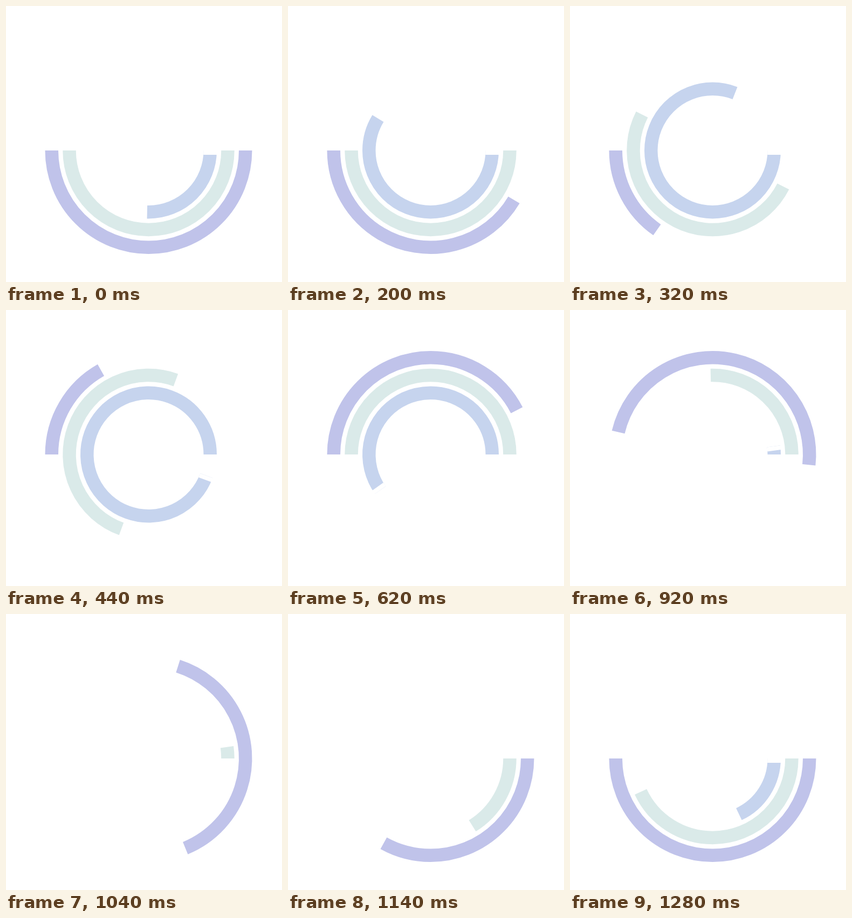
Write an HTML page with a canvas that moves like this. It is 512 px wide and 512 px high and loops after 1.3 s.

```html
<!DOCTYPE html>
<html lang="en">
<head>
<meta charset="utf-8">
<title>Ring loader</title>
<style>
  html, body { margin: 0; width: 100%; height: 100%; overflow: hidden; background: #fff; }
  canvas { display: block; width: 100vw; height: 100vh; }
</style>
</head>
<body>
<canvas id="stage" width="512" height="512"></canvas>
<script>
const ctx = document.getElementById('stage').getContext('2d');
const LOOP = 1300, STEP = 20, BEAT = LOOP / 5;
const CX = 264.5, CY = 268, BAND = 24.5;
const HALF = Math.PI, FULL = 2 * Math.PI;

// linear progress from 0 to 1
const ramp = (t, start, duration) => Math.min(1, Math.max(0, (t - start) / duration));

// each ring grows at its head and is wiped from its tail, clockwise from the right
const rings = [
  {
    color: '#c0c3ea', radius: 179.75, notch: 0,
    tail: t => HALF * (ramp(t, 161, 229) + ramp(t, 903, 229)),
    head: t => HALF * (1 + ramp(t, 322, 351) + ramp(t, 908, 351))
  },
  {
    color: '#daeae9', radius: 147, notch: 0,
    tail: t => HALF * (ramp(t, 281, BEAT) + ramp(t, 792, BEAT)),
    head: t => HALF * (1 + ramp(t, 281, BEAT) + ramp(t, 1056, BEAT))
  },
  {
    color: '#c6d4ee', radius: 114.25, notch: 8,
    tail: t => FULL * ramp(t, 411, 2 * BEAT),
    head: t => FULL * (ramp(t, -117, 540) + ramp(t, LOOP - 117, 540))
  }
];

function drawRing({ color, radius, notch, tail, head }, t) {
  const from = tail(t), to = head(t);
  if (to - from < 1e-4) return;
  ctx.save();
  ctx.translate(CX, CY);
  ctx.rotate(from);
  ctx.strokeStyle = color;
  ctx.beginPath();
  ctx.arc(0, 0, radius, 0, to - from);
  ctx.stroke();
  // the wiped end is cut straight, a little ahead of the tail
  ctx.fillRect(radius - BAND / 2 - 0.3, 0, BAND + 1, notch);
  ctx.restore();
}

function draw(now) {
  // the first step is held twice as long
  const t = Math.max(STEP, Math.floor(now % LOOP / STEP) * STEP);
  ctx.fillStyle = '#fff';
  ctx.fillRect(0, 0, 512, 512);
  ctx.lineWidth = BAND;
  for (const ring of rings) drawRing(ring, t);
}

const start = performance.now();
function tick() {
  draw(performance.now() - start);
  requestAnimationFrame(tick);
}
tick();
</script>
</body>
</html>
```
